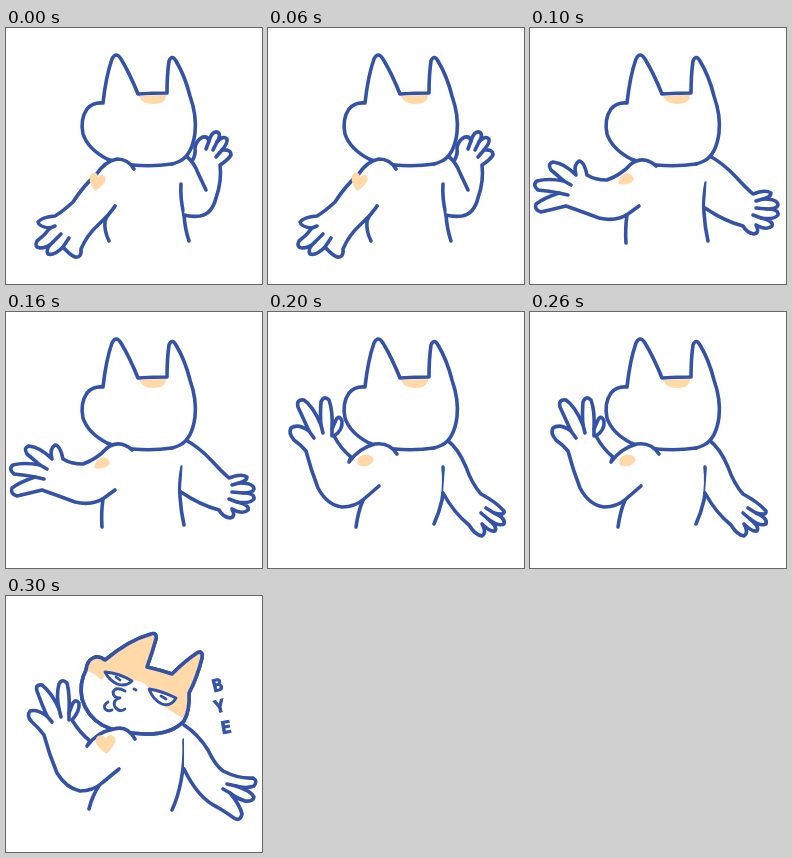
An HTML page that plays this animation: 256 px wide and 256 px high, repeating every 0.4 s.

```html
<!DOCTYPE html>
<html lang="en">
<head>
<meta charset="utf-8">
<title>Waving cat</title>
<style>
  html, body { margin: 0; height: 100%; overflow: hidden; background: #fff; }
  svg { display: block; width: 100%; height: 100%; }
  path { fill: none; stroke: #3452a8; stroke-width: 3.6; stroke-linecap: round; stroke-linejoin: round; }
  .solid { fill: #fff; }
  .patch { fill: #ffd9a8; stroke: none; }
  .fine { stroke-width: 2.8; }
  .faint { stroke: #b4bdcf; stroke-width: 2; }
  .pose { visibility: hidden; }
  text { font: bold 17px "DejaVu Sans Mono", monospace; fill: #3452a8; stroke: #3452a8; stroke-width: 1; text-anchor: middle; }
</style>
</head>
<body>
<svg viewBox="0 0 256 256">
  <defs>
    <g id="back-head">
      <path class="solid" d="M126 137 Q112 136 101 131 Q82 121 77 106 Q74 91 81 81 Q87 74 97 75 Q100 48 106 31 Q110 23 115 31 Q124 46 132 66 Q147 65 161 65 Q161 47 163 33 Q166 26 170 33 Q179 48 184 68 Q191 88 189 105 Q186 127 174 133 Q170 135 166 136"/>
      <path class="patch" d="M133 68 Q147 67 160 67 Q160 76 147 76 Q136 76 133 68Z"/>
    </g>
    <path id="jaw" d="M126 137 Q147 139 166 136"/>
    <path id="heart" class="patch" d="M0 10 Q-9 3 -10 -3 Q-10 -9 -5 -9 Q-1 -9 0 -5 Q3 -10 7 -8 Q12 -5 8 1 Q5 6 0 10Z"/>
    <path id="front-head" d="M99 64 Q123 44 145 38 Q151 36 150 43 Q146 57 141 71 Q154 74 166 78 Q179 65 191 57 Q197 54 196 62 Q191 82 183 97 Q184 114 178 125 Q165 139 138 138 Q111 137 96 129 Q81 120 76 103 Q73 87 80 74 Q81 65 87 62 Q93 59 99 64Z"/>
    <clipPath id="face-clip"><use href="#front-head"/></clipPath>
  </defs>

  <g class="pose">
    <path d="M109 178 Q102 185 99 193 Q98 203 103 213 M175 156 Q174 170 178 187 Q179 201 183 213"/>
    <path class="solid" stroke-width="3" d="M186 133 Q190 127 189 120 Q190 112 197 109 Q202 108 203 113 Q206 103 211 104 Q216 106 211 114 Q217 107 221 111 Q222 115 216 122 Q225 121 225 127 Q222 132 214 137 Q216 153 210 170 Q206 186 194 188 Q185 189 178 187"/>
    <path d="M180 128 Q188 134 192 145 L200 162 M203 113 L200 121 M211 114 L207 122 M216 122 L210 129"/>
    <use href="#back-head"/>
    <use href="#jaw" class="faint-jaw"/>
    <path class="solid" d="M128 141 Q122 131 111 131 Q99 133 90 147 Q78 157 67 174 Q56 184 49 188 Q36 189 32 194 Q33 199 44 200 Q39 207 31 213 Q28 219 34 220 Q42 220 47 214 Q39 221 42 226 Q48 228 57 219 Q64 227 69 229 Q76 230 75 221 Q81 207 92 197 Q104 186 109 178"/>
    <path d="M44 200 L49 198 M47 214 L55 206 M57 219 L63 210"/>
    <use href="#heart" transform="translate(91 154) rotate(12) scale(.82 .95)"/>
  </g>

  <g class="pose">
    <path d="M97 187 Q95 200 96 215 M176 155 Q173 170 174 185 Q175 200 178 213"/>
    <path class="solid" d="M178 127 Q193 135 206 149 Q216 160 223 166 Q235 161 241 165 Q241 169 233 171 Q248 171 248 177 Q247 181 237 181 Q249 181 248 187 Q244 192 231 190 Q244 193 242 198 Q237 203 226 197 Q230 205 224 206 Q217 205 213 198 Q194 193 175 180"/>
    <path d="M233 171 L226 173 M237 181 L226 180 M231 190 L223 187"/>
    <use href="#back-head"/>
    <use href="#jaw"/>
    <path class="solid" d="M126 138 Q114 127 101 136 Q91 147 77 152 Q65 152 57 147 Q54 133 49 133 Q43 137 46 147 Q34 135 23 134 Q17 136 21 142 Q27 147 34 153 Q18 150 7 153 Q2 157 8 162 Q19 163 29 165 Q14 170 6 176 Q4 182 11 184 Q24 181 36 178 Q53 184 69 190 Q86 194 98 186 L109 178"/>
    <path d="M34 153 L41 157 M29 165 L38 167"/>
    <path class="patch" d="M88 156 Q90 146 97 145 Q104 147 104 152 Q98 158 88 156Z"/>
  </g>

  <g class="pose">
    <path d="M95 188 Q90 200 88 215 M175 155 Q177 171 174 188 Q171 201 166 212"/>
    <path class="solid" d="M179 128 Q190 136 198 155 Q204 172 213 182 Q228 190 236 199 Q237 204 226 201 Q238 206 236 212 Q231 215 220 207 Q230 215 227 219 Q222 220 214 212 Q219 221 214 224 Q207 223 201 213 Q186 201 175 181"/>
    <path d="M226 201 L218 196 M220 207 L213 201"/>
    <use href="#back-head"/>
    <use href="#jaw"/>
    <path class="solid" d="M129 142 Q121 130 107 132 Q91 136 81 150 L83 145 Q73 137 66 124 Q75 118 74 109 Q71 102 68 108 L64 117 Q65 99 61 88 Q56 83 53 90 Q52 103 53 113 Q45 94 36 88 Q28 87 30 95 Q36 108 41 119 Q30 111 23 116 Q20 121 26 128 Q33 133 38 139 Q43 158 50 176 Q59 193 74 195 Q87 195 96 187 L111 174"/>
    <path d="M41 119 L46 126 M53 113 L55 121 M64 117 L64 124"/>
    <path class="patch" d="M89 152 Q89 144 95 143 Q104 142 106 148 Q102 155 96 154 Q92 155 89 152Z"/>
  </g>

  <g class="pose">
    <path d="M94 188 Q86 200 83 213 M178 144 Q179 165 175 185 Q172 201 166 214"/>
    <path class="solid" d="M178 129 Q192 138 202 154 Q209 169 217 175 Q233 183 247 182 Q252 185 248 190 Q240 193 230 190 Q245 195 248 201 Q247 206 239 205 Q230 202 224 197 Q234 209 236 218 Q234 226 228 222 Q218 215 211 211 Q192 202 178 173"/>
    <path d="M230 190 L221 188 M224 197 L217 193"/>
    <use href="#front-head" class="solid"/>
    <g clip-path="url(#face-clip)">
      <path class="patch" d="M78 66 L88 58 L148 34 L202 52 L184 125 Q172 120 163 114 Q149 103 142 91 Q136 84 127 84 L99 76 Q99 82 95 84 Q88 76 78 74Z"/>
    </g>
    <use href="#front-head"/>
    <path class="fine solid" d="M99 76 Q113 77 126 85 Q120 91 111 88 Q103 84 99 76Z M143 93 Q156 95 170 102 Q165 111 156 108 Q147 104 143 93Z"/>
    <path class="fine" d="M110 81 L114 84 M155 100 L160 103 M128 93 L130 94 M119 95 Q110 90 107 96 Q107 102 114 102 Q106 104 109 111 Q114 117 119 113 M102 106 Q97 109 99 113 Q102 116 106 114"/>
    <path class="solid" d="M129 143 Q121 129 108 133 Q91 136 81 150 L84 145 Q74 137 66 124 Q74 115 73 107 Q69 102 66 109 L63 117 Q64 98 61 87 Q56 82 53 88 Q50 99 53 113 Q46 97 36 89 Q29 88 31 95 Q36 109 41 120 Q31 113 24 115 Q20 120 26 126 Q33 132 38 139 Q43 158 51 177 Q60 192 74 195 Q87 195 96 187 L113 173"/>
    <path d="M41 120 L46 126 M53 113 L55 121 M63 117 L63 124"/>
    <use href="#heart" transform="translate(100 148) rotate(-4)"/>
    <text transform="translate(213 95) rotate(-14)">B</text>
    <text transform="translate(215 116) rotate(-14)">Y</text>
    <text transform="translate(221 137) rotate(-10)">E</text>
  </g>
</svg>
<script>
  const POSE_MS = 100;
  const poses = [...document.querySelectorAll(".pose")];
  const start = performance.now();

  function draw(now) {
    const current = Math.floor(Math.max(0, now - start) / POSE_MS) % poses.length;
    poses.forEach((pose, i) => pose.style.visibility = i === current ? "visible" : "hidden");
    requestAnimationFrame(draw);
  }
  draw(start);
</script>
</body>
</html>
```
